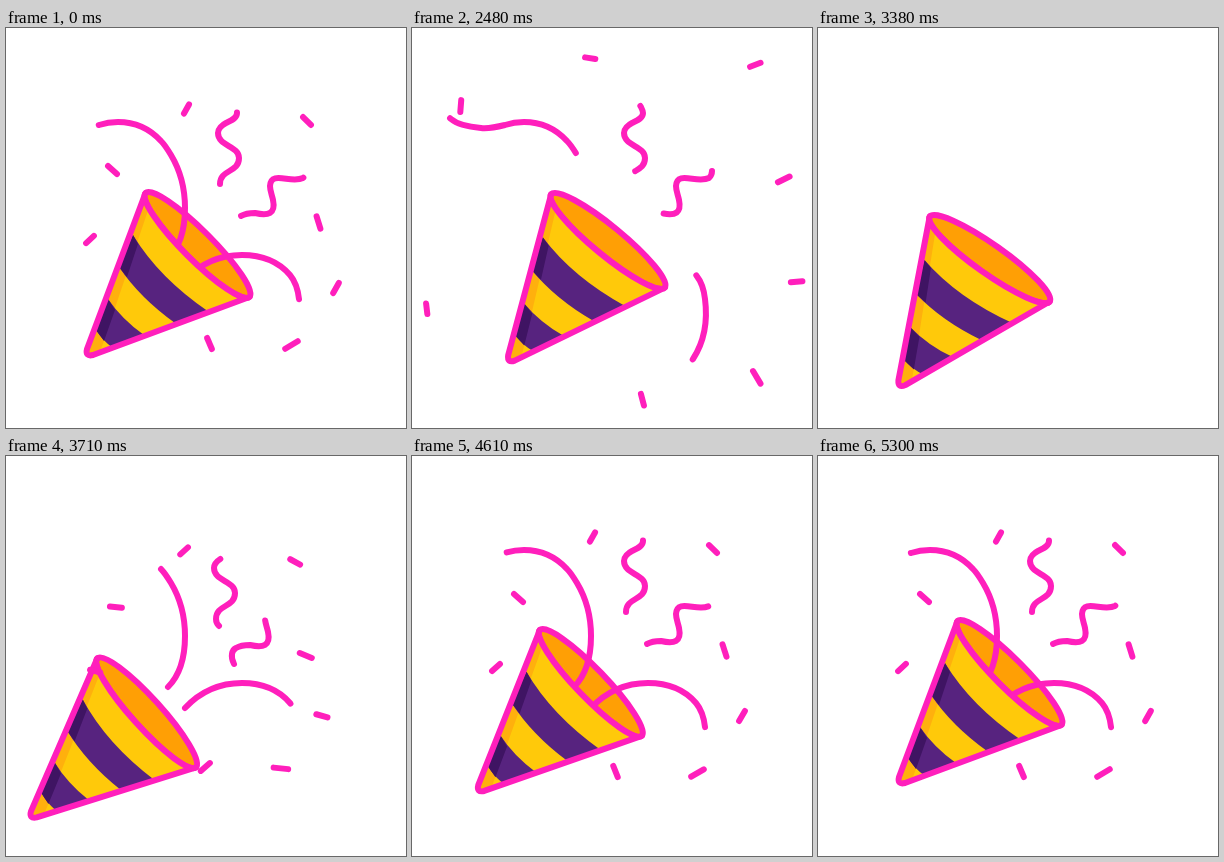
These frames come from a looping animation (400 px wide and 400 px high, 5.36 s). An HTML page:

```html
<!DOCTYPE html>
<html lang="en">
<head>
<meta charset="utf-8">
<title>Party popper</title>
<style>
  html, body { margin: 0; width: 100%; height: 100%; overflow: hidden; background: #fff; }
  svg { display: block; width: 100vw; height: 100vh; }
  .line { fill: none; stroke: #ff1fbc; stroke-width: 6; stroke-linecap: round; stroke-linejoin: round; }
</style>
</head>
<body>
<svg viewBox="0 0 400 400">
  <defs>
    <clipPath id="body">
      <path d="M139.500 165A73.500 14.500 45 0 0 243.500 269L87 327Q79 329 81 321Z"/>
    </clipPath>
  </defs>
  <g class="cone">
    <ellipse class="line" style="fill:#ff9f05" cx="191.500" cy="217" rx="73.500" ry="14.500" transform="rotate(45 191.500 217)"/>
  </g>
  <g id="streamers"></g>
  <g class="cone">
    <g clip-path="url(#body)">
      <path fill="#ffc90a" d="M70 150H260V340H70Z"/>
      <path fill="#ffb00d" d="M130 150L153 150L92 330H70Z"/>
      <path fill="#57237f" d="M127 207Q153 250 203 284L169 295Q134 270 113 239ZM102 271Q116 291.500 138 307L107 320Q96.500 312.500 90 302Z"/>
      <path fill="#3f1463" d="M127 207L132 216L121 249L113 239ZM102 271L109 282L98 313L90 302Z"/>
    </g>
    <path class="line" d="M139.500 165A73.500 14.500 45 0 0 243.500 269L87 327Q79 329 81 321Z"/>
  </g>
  <g id="confetti"></g>
</svg>
<script>
const LOOP = 5360, OUT = 2010, BURST = 3440;
const NS = 'http://www.w3.org/2000/svg';

const clamp = x => Math.min(1, Math.max(0, x));
const lerp = (a, b, p) => a + (b - a) * p;
const span = (t, a, b) => clamp((t - a) / (b - a));
const sine = x => (1 - Math.cos(Math.PI * x)) / 2;

// Cubic bezier easing with handles (a,0) and (b,1)
function ease(x, a, b) {
  let lo = 0, hi = 1;
  for (let i = 0; i < 24; i++) {
    const u = (lo + hi) / 2, v = 1 - u;
    if (3 * u * v * v * a + 3 * u * u * v * b + u * u * u < x) lo = u; else hi = u;
  }
  return lo * lo * (3 - 2 * lo);
}

function add(parent, d) {
  const el = document.createElementNS(NS, 'path');
  el.setAttribute('class', 'line');
  el.setAttribute('d', d);
  return document.getElementById(parent).appendChild(el);
}

// rest / gone: knots [tail, head] at rest and `ref` ms after leaving; k: power of the departure;
// decay: growth rate in the burst; shift: offset early in the burst
const streamers = [
  { d: 'M162 231C172 221 179 204 179 180C179 160 174 142 165 127C162 122 159 117 155 113C144 101 130 94 112 94C105 94 99 95 93 97C85 99 77 101 69 100C58 99 46 97 39 91C10 68 75 20 79 60C80 69 74 76 64 79',
    rest: [0, 5], gone: [8, 9], ref: 1040, k: 1.4, decay: .0039, shift: [0, 0] },
  { d: 'M179 252C194 236 213 227 236 227C256 227 272 233 284 247C289 253 292 262 293 271C296 294 292 314 281 331C275 340 270 346 264 352',
    rest: [0, 3], gone: [2, 4], ref: 470, k: 1.4, decay: .0064, shift: [0, 0] },
  { d: 'M217 163C215 161 214 159 214 156C214 141 233 145 233 130C233 118 212 118 212 105C212 101 216 97 220 95C226 92 231 90 231 85C231 83 230 81 229 79C224 70 205 72 210 58C212 52 217 48 224 46',
    rest: [1, 5], gone: [7, 8], ref: 1040, k: 2.65, decay: .0065, shift: [-4, 7] },
  { d: 'M233 204C229 196 231 190 235 188C240 185 244 185 249 185C262 188 270 186 267 172C266 167 264 163 264 158C265 142 285 156 297 150C299 148 300 146 300 143C301 128 284 118 300 116C307 114 313 115 319 117',
    rest: [1, 5], gone: [7, 8], ref: 1040, k: 2.65, decay: .0038, shift: [-5, 4] }
];
for (const s of streamers) {
  s.el = add('streamers', s.d);
  const parts = s.d.split('C');
  const at = parts.map((_, i) => {
    if (!i) return 0;
    s.el.setAttribute('d', parts.slice(0, i + 1).join('C'));
    return s.el.getTotalLength();
  });
  s.rest = s.rest.map(i => at[i]);
  s.gone = s.gone.map(i => at[i]);
  s.total = at[at.length - 1];
}

// x, y, angle, half length, flight dx, dy, turn, vanishing time, turn left in the burst
const confetti = [
  [180.5, 81, -61, 5.2, -3, -66, -143, 3200, 66],
  [106.5, 142, 42, 6, -75, -83, 302, 3200, -129],
  [301, 93, 45, 5.6, 55, -73, 382, 3250, -59],
  [312.5, 194.5, 73, 6.5, 77, -56, 105, 2750, -181],
  [330, 260, -61, 5.8, 71, -8, 73, 2680, 275],
  [285.5, 317, -31, 7.3, 77, 42, 117, 2800, 132],
  [203.5, 315.5, 67, 6, 35, 73, 11, 2660, 258],
  [84, 211.5, -43, 5.3, -90, 90, 164, 2590, 209]
].map(([x, y, turn, half, dx, dy, spin, end, left]) =>
  ({ x, y, turn, dx, dy, spin, end, left, el: add('confetti', `M${-half} 0H${half}`) }));

const cones = document.querySelectorAll('.cone');

function drawCone(t) {
  let turn, away;
  if (t < 3650) {
    turn = t < 3100 ? -14.2 * sine(span(t, OUT, 3100)) : lerp(-14.2, 2.9, span(t, 3100, 3650) ** 2);
    away = sine(span(t, 3100, 3620));
  } else {
    const x = span(t, 3650, 5310);
    turn = 2.9 * (1 - sine(x));
    away = 1 - ease(x, .42, .4);
  }
  for (const c of cones)
    c.setAttribute('transform', `translate(${-48.5 * away} ${38 * away}) rotate(${turn} 152 169)`);
}

function drawStreamer(s, t) {
  let [tail, head] = s.rest, dx = 0, dy = 0;
  if (t >= BURST) {
    const settle = sine(span(t, 3700, 4250));
    tail *= settle;
    head *= 1 - Math.exp(-s.decay * (t - BURST));
    [dx, dy] = s.shift.map(v => v * (1 - settle));
  } else if (t > OUT) {
    const p = ((t - OUT) / s.ref) ** s.k;
    tail = lerp(tail, s.gone[0], p);
    head = Math.min(s.total, lerp(head, s.gone[1], p));
  }
  s.el.style.display = head > tail ? '' : 'none';
  s.el.setAttribute('stroke-dasharray', `${Math.max(.01, head - tail)} 9999`);
  s.el.setAttribute('stroke-dashoffset', -tail);
  s.el.setAttribute('transform', `translate(${dx} ${dy})`);
}

function drawPiece(c, t) {
  let { x, y, turn } = c, size = 1;
  if (t >= BURST) {
    const rest = Math.exp(-.0094 * (t - BURST));
    x = lerp(x, 150, rest);
    y = lerp(y, 258, rest);
    turn += c.left * Math.exp(-.0047 * (t - BURST));
  } else if (t > OUT) {
    const p = ease(span(t, OUT, OUT + 1080), .17, .17);
    x += c.dx * p;
    y += c.dy * p;
    turn += c.spin * p;
    size = span(t, c.end, c.end - 80);
  }
  c.el.style.display = size ? '' : 'none';
  c.el.setAttribute('transform', `translate(${x} ${y}) rotate(${turn}) scale(${size})`);
}

for (const s of streamers) s.el.setAttribute('d', s.d);
const begin = performance.now();
function frame() {
  const t = (performance.now() - begin) % LOOP;
  drawCone(t);
  for (const s of streamers) drawStreamer(s, t);
  for (const c of confetti) drawPiece(c, t);
  requestAnimationFrame(frame);
}
frame();
</script>
</body>
</html>
```
